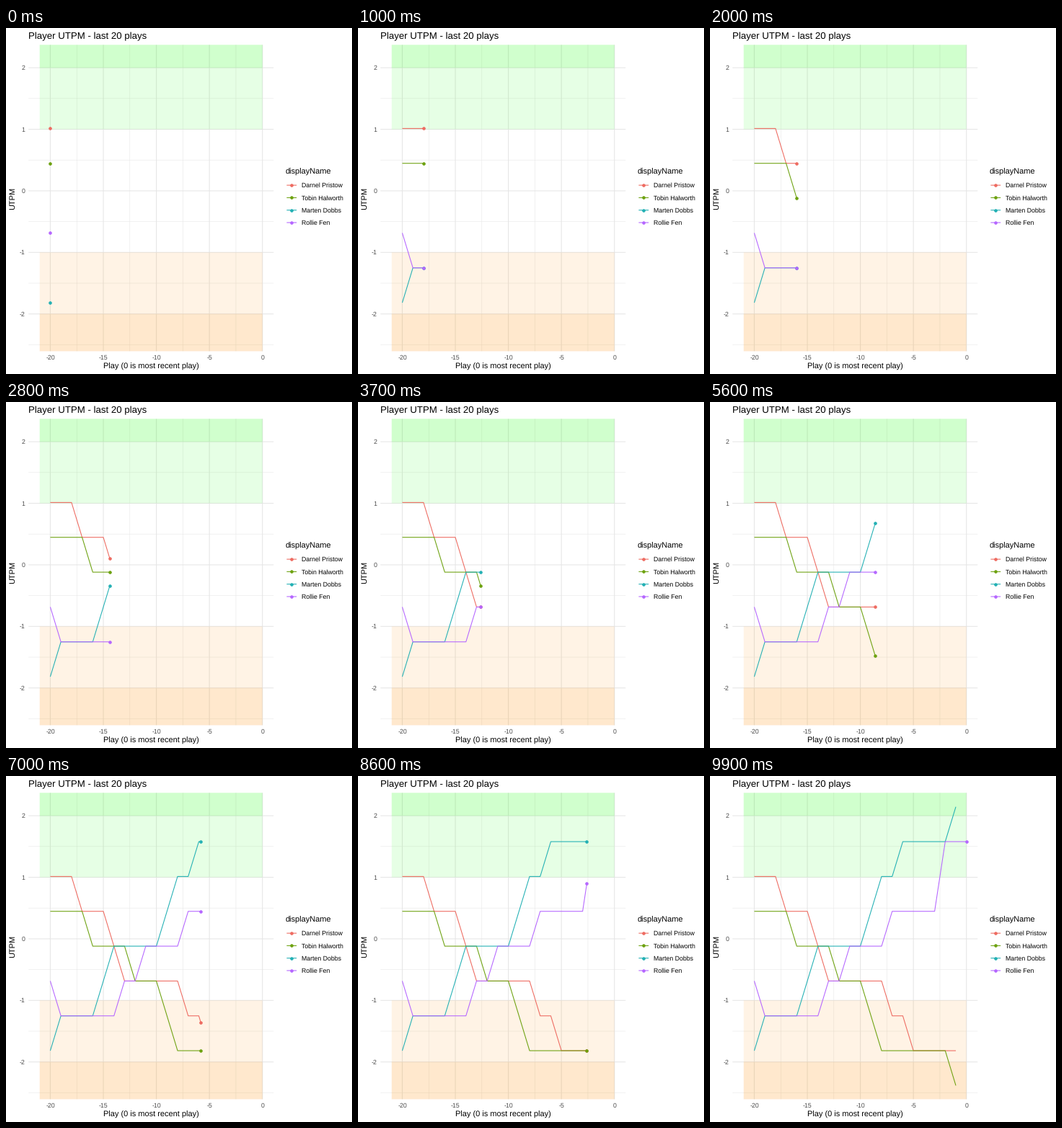
A matplotlib script that plays this animation: 480x480 px, repeating every 10 s.

```python
import numpy as np
import matplotlib.pyplot as plt
from matplotlib.animation import FuncAnimation
from matplotlib.patches import Rectangle

plt.rcParams.update({
    "font.family": "Liberation Sans",
    "path.snap": False,
    "text.hinting": "none",
    "lines.solid_capstyle": "butt",
})

SIZE, FRAMES, PLAYS = 480, 100, 20
LEFT, RIGHT, TOP, BOTTOM = 31.2, 371.2, 23.3, 448.4
LINE_W = 1.07
DOT = dict(ls="", marker="o", ms=3.74, mew=0.71)

# Scores move on a ladder of evenly spaced levels, one entry per play.
PLAYERS = [
    ("Darnel Pristow", "#ee6a60",
     [2] * 3 + [1] * 3 + [0] + [-1] * 6 + [-2] * 2 + [-3] * 5),
    ("Tobin Halworth", "#6ca10e",
     [1] * 4 + [0] * 4 + [-1] * 3 + [-2] + [-3] * 7 + [-4]),
    ("Marten Dobbs", "#22b0b4",
     [-3] + [-2] * 4 + [-1] + [0] * 5 + [1] + [2] * 2 + [3] * 5 + [4]),
    ("Rollie Fen", "#b566ff",
     [-1] + [-2] * 6 + [-1] * 2 + [0] * 4 + [1] * 5 + [3] * 3),
]


def px(play):
    return 355.75 + 14.715 * np.asarray(play)


def py(score):
    return 225.9 - 85.4 * np.asarray(score)


def score(level):
    return -0.119 + 0.566 * np.asarray(level)


fig = plt.figure(figsize=(SIZE / 72, SIZE / 72), dpi=72, facecolor="white")
ax = fig.add_axes([0, 0, 1, 1])
ax.set_xlim(0, SIZE)
ax.set_ylim(SIZE, 0)
ax.axis("off")


def label(x, y, text, size, color="black", **kw):
    ax.text(x, y, text, fontsize=size, color=color,
            **{"va": "baseline", **kw})


def grid(xs, ys, width):
    for x in px(xs):
        ax.plot([x, x], [TOP, BOTTOM], color="#e6e6e6", lw=width, zorder=1)
    for y in py(ys):
        ax.plot([LEFT, RIGHT], [y, y], color="#e6e6e6", lw=width, zorder=1)


def band(y1, y2, color):
    x1, x2 = px([-21, 0])
    ax.add_patch(Rectangle((x1, y1), x2 - x1, y2 - y1, fc=color, lw=0,
                           alpha=0.1, zorder=2))


grid(np.arange(-17.5, 0, 5), np.arange(-2.5, 2, 1), 0.53)
grid(np.arange(-20, 1, 5), np.arange(-2, 3), LINE_W)

for limit in (1, 2):
    band(TOP, py(limit), (0.07, 1, 0))
    band(py(-limit), BOTTOM, (1, 0.56, 0))

label(31, 15.2, "Player UTPM - last 20 plays", 13.2)
label(201.2, 473, "Play (0 is most recent play)", 11, ha="center")
ax.text(9.6, 236, "UTPM", fontsize=11, rotation=90, ha="center", va="center")
for play in range(-20, 1, 5):
    label(px(play), 460, str(play), 8.8, "#4d4d4d", ha="center")
for tick in range(-2, 3):
    label(26.3, py(tick) + 3.2, str(tick), 8.8, "#4d4d4d", ha="right")

label(387.6, 203, "displayName", 11)
for row, (name, color, _) in enumerate(PLAYERS):
    y = 218.1 + 17.28 * row
    ax.plot([389.4, 403.2], [y, y], color=color, lw=LINE_W)
    ax.plot([396.3], [y], color=color, **DOT)
    label(410.3, y + 3.2, name, 8.8)

# Each play lands on a whole frame.
key_frames = np.round(np.arange(PLAYS + 1) * (FRAMES - 1) / PLAYS)

tracks = []
for name, color, levels in PLAYERS:
    n = len(levels)
    xs, ys = px(np.arange(n) - PLAYS), py(score(levels))
    line, = ax.plot([], [], color=color, lw=LINE_W, zorder=3)
    dot, = ax.plot([], [], color=color, zorder=4, **DOT)
    tracks.append((key_frames[:n], xs, ys, line, dot))


def update(frame):
    artists = []
    for keys, xs, ys, line, dot in tracks:
        head_x = np.interp(frame, keys, xs)
        head_y = np.interp(frame, keys, ys)
        past = keys < frame
        line.set_data(np.append(xs[past], head_x), np.append(ys[past], head_y))
        dot.set_data([head_x], [head_y])
        dot.set_visible(bool(frame <= keys[-1]))
        artists += [line, dot]
    return artists


anim = FuncAnimation(fig, update, frames=FRAMES, interval=100,
                     repeat=True, repeat_delay=0, blit=False)
plt.show()
```
